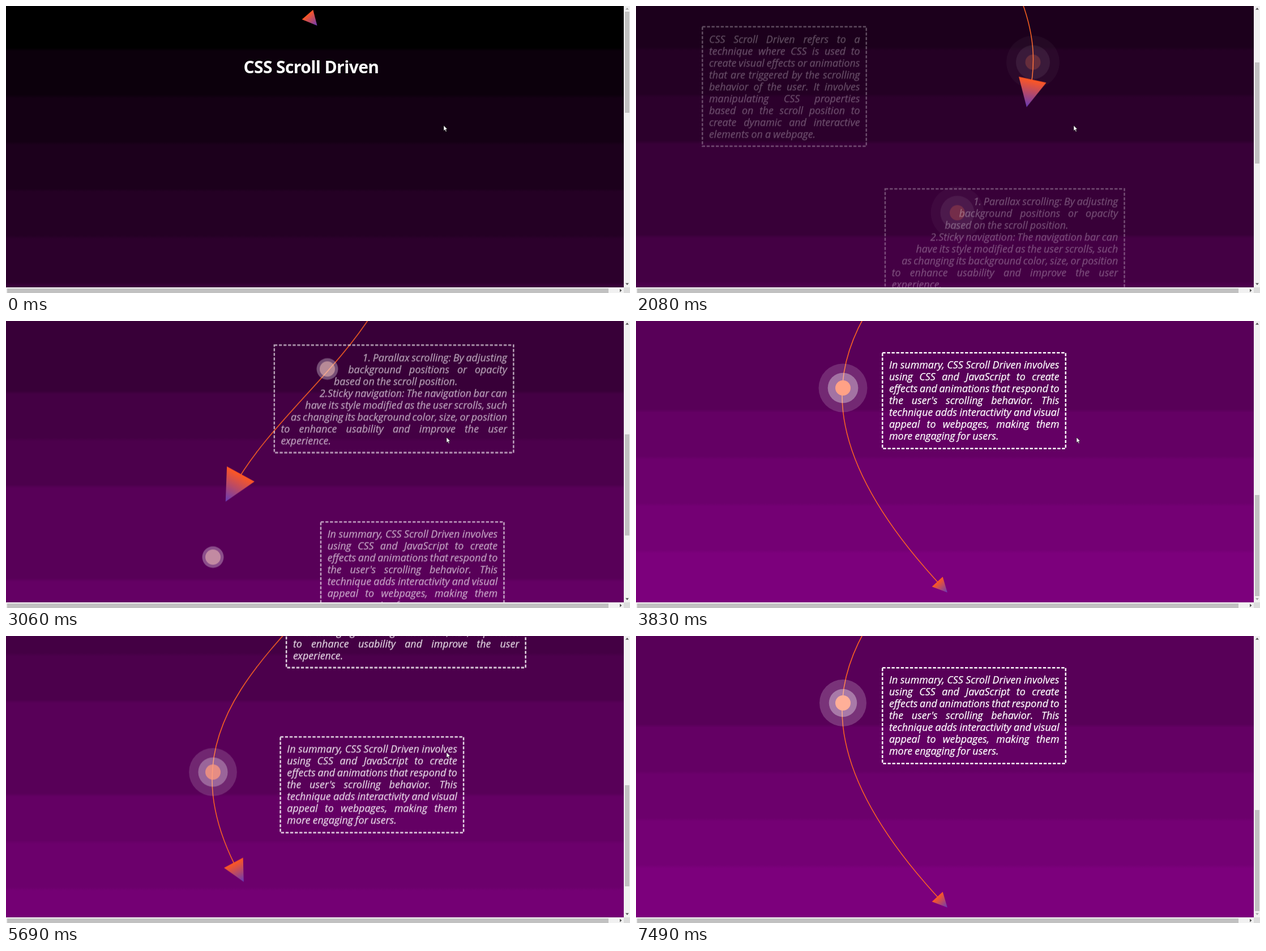
An HTML page that plays this animation: 1102 px wide and 508 px high, repeating every 7.51 s.

```html
<!DOCTYPE html>
<html lang="en">
<head>
<meta charset="utf-8">
<title>CSS Scroll Driven</title>
<style>
html, body { margin: 0; width: 100%; height: 100%; overflow: hidden; background: #f1f1f1; }
#stage { position: relative; width: 1102px; height: 508px; overflow: hidden; }
#view { position: absolute; width: 1091px; height: 498px; overflow: hidden; background: #000; }
#page { position: absolute; left: 0; top: 0; width: 1091px; height: 1329px; will-change: transform; }
#page > * { position: absolute; }
h1 {
  left: 419.5px; top: 88px; margin: 0; white-space: nowrap; color: #fff;
  font: bold 30px/40px "Open Sans", "Noto Sans", sans-serif; letter-spacing: -.6px;
}
svg { position: absolute; left: 0; top: 0; overflow: visible; }
.box {
  left: 0; box-sizing: border-box; padding: 12.5px 12.5px 12.5px 13px; color: #fff;
  font: italic 17.9px/21px "Open Sans", "Noto Sans", sans-serif; word-spacing: -3px;
  -webkit-text-stroke: .25px #fff;
}
.box svg { width: 100%; height: 100%; }
.box rect {
  x: 1.25px; y: 1.25px; width: calc(100% - 2.5px); height: calc(100% - 2.5px);
  fill: none; stroke: #fff; stroke-width: 2.5; stroke-dasharray: 5.4 2.7;
}
.line { position: relative; height: 21px; white-space: nowrap; text-align: justify; text-align-last: justify; }
.line.end { text-align-last: left; word-spacing: -.5px; }
.bar { position: absolute; background: #c1c1c1; }
#vbar { left: 1093px; top: 0; width: 8px; height: 179px; }
#hbar { left: 2px; top: 499.5px; width: 1062px; height: 8px; }
#corner { position: absolute; left: 1091px; top: 498px; width: 11px; height: 10px; background: #dcdcdc; }
</style>
</head>
<body>
<div id="stage">
  <div id="view">
    <div id="page">
      <h1>CSS Scroll Driven</h1>
      <svg id="back" width="1091" height="1329">
        <path id="trail" fill="none" stroke="#ff6422" stroke-width="1.5"
          d="M541 25 Q701.5 209 701.5 345 C701.5 600 364 723 364 962 Q364 1112 541 1302"/>
      </svg>
      <svg id="front" width="1091" height="1329">
        <defs>
          <linearGradient id="fade"><stop stop-color="#ff5722"/><stop offset="1" stop-color="#673ab7"/></linearGradient>
        </defs>
        <path id="arrow" d="M-.5 -.5 L.5 0 L-.5 .5 Z" fill="url(#fade)"/>
      </svg>
    </div>
  </div>
  <div id="vbar" class="bar"></div>
  <div id="hbar" class="bar"></div>
  <div id="corner"></div>
  <svg width="1102" height="508">
    <path id="up" d="M1094 6.5 h6 l-3 -3.5 z"/>
    <path id="down" d="M1094 490.5 h6 l-3 3.5 z"/>
    <path d="M1084 500.5 v6 l3.5 -3 z" fill="#505050"/>
    <path id="cursor" d="M0 0 V9.2 L2.1 7.4 L3.7 10.9 L5.2 10.2 L3.6 6.9 L6.4 6.6 Z"
      fill="#fff" stroke="#000" stroke-width=".5"/>
  </svg>
</div>
<script>
const LOOP = 7510, MAX = 831, PULSE = 1930, LAG = 30, DOT = 13.5;
const $ = id => document.getElementById(id);
const page = $('page'), trail = $('trail'), arrow = $('arrow'), front = $('front');

// [time, scroll offset]
const SCROLL = [
  [1510, 0], [1545, 30], [1900, 195], [2050, 239], [2080, 250.5], [2260, 262],
  [2290, 268], [2900, 515], [3000, 531], [3060, 531], [3550, 815], [3620, MAX],
  [4250, MAX], [4400, 700], [4600, 475], [4780, 243], [4810, 203], [4970, 0],
  [5250, 0], [5600, 655], [5655, 708], [5690, 708], [5880, MAX]
];
const CURSOR_X = [[2900, 773], [3000, 778], [6200, 778], [6550, 768]];
const CURSOR_Y = [[2900, 211.5], [3000, 206], [6200, 206], [6550, 510]];

// pulse rings: [phase, value]
const INNER = [[0, 0], [.67, 13.2], [.77, 16.6], [1, 20]];
const OUTER = [[0, 0], [.28, 5.6], [.57, 28], [.67, 29.3], [.77, 33.5], [1, 40]];
const INNER_ALPHA = [[.67, .35], [1, 0]];
const OUTER_ALPHA = [[.6, .2], [1, 0]];

function at(table, t) {
  if (t <= table[0][0]) return table[0][1];
  for (let i = 1; i < table.length; i++) {
    const [t0, a] = table[i - 1], [t1, b] = table[i];
    if (t <= t1) return a + (b - a) * (t - t0) / (t1 - t0);
  }
  return table[table.length - 1][1];
}

function bands() {
  const merged = { 0: 0, 6: 56, 7: 56, 10: 88, 11: 88 };
  const stops = [];
  for (let k = 0; k < 16; k++) {
    const c = merged[k] ?? 8 * k + 4;
    const end = k < 15 ? 83 * k + 74 : 1329;
    stops.push(`rgb(${c},0,${c}) ${k ? 83 * k - 3 : 0}px ${end}px`);
  }
  return `linear-gradient(${stops})`;
}
page.style.background = bands();

function svgNode(parent, tag, attrs = {}) {
  const el = document.createElementNS('http://www.w3.org/2000/svg', tag);
  for (const k in attrs) el.setAttribute(k, attrs[k]);
  return parent.appendChild(el);
}

const dots = [[701, 350], [567.5, 616.5], [365.5, 949.5]].map(([cx, cy]) => {
  const group = svgNode($('back'), 'g');
  const circle = () => svgNode(group, 'circle', { cx, cy, r: DOT, fill: '#fff' });
  return { group, outer: circle(), inner: circle(), core: circle() };
});

// a trailing "/" marks a line that is not justified
const BOXES = [
  { top: 286, width: 292, x: 15, shift: 335, text:
    'CSS Scroll Driven refers to a|technique where CSS is used to|create visual effects or animations|' +
    'that are triggered by the scrolling|behavior of the user. It involves|manipulating CSS properties|' +
    'based on the scroll position to|create dynamic and interactive|elements on a webpage./' },
  { top: 573, width: 425, x: 408.6, shift: 100, slope: 144, text:
    '1. Parallax scrolling: By adjusting|background positions or opacity|based on the scroll position./|' +
    '2.Sticky navigation: The navigation bar can|have its style modified as the user scrolls, such|' +
    'as changing its background color, size, or position|to enhance usability and improve the user|experience./' },
  { top: 885.5, width: 326, x: 769, shift: -335, text:
    'In summary, CSS Scroll Driven involves|using CSS and JavaScript to create|' +
    'effects and animations that respond to|the user\'s scrolling behavior. This|' +
    'technique adds interactivity and visual|appeal to webpages, making them|more engaging for users./' }
];

for (const b of BOXES) {
  b.el = document.createElement('div');
  b.el.className = 'box';
  b.el.style.top = b.top + 'px';
  b.el.style.width = b.width + 'px';
  b.el.innerHTML = '<svg><rect/></svg>';
  b.text.split('|').forEach((text, i) => {
    const line = document.createElement('div');
    line.className = text.endsWith('/') ? 'line end' : 'line';
    line.textContent = text.replace('/', '');
    line.style.marginLeft = Math.max(0, (b.slope || 0) - 25.3 * i) + 'px';
    b.el.append(line);
  });
  page.insertBefore(b.el, front);
}

const length = trail.getTotalLength();

function drawArrow(p) {
  const d = p * length;
  const c = trail.getPointAtLength(d);
  const a = trail.getPointAtLength(Math.max(0, d - 1));
  const b = trail.getPointAtLength(Math.min(length, d + 1));
  const angle = Math.atan2(b.y - a.y, b.x - a.x) * 180 / Math.PI;
  const size = 67 - 82 * Math.abs(p - .5);
  arrow.setAttribute('transform', `translate(${c.x} ${c.y}) rotate(${angle}) scale(${size})`);
  trail.style.strokeDasharray = `${d} ${length + 10}`;
}

function drawDots(t, p) {
  const u = ((t - 3830) / PULSE + 2.674) % 1;
  const ring = (el, size, alpha) => {
    el.setAttribute('r', DOT + at(size, u));
    el.setAttribute('fill-opacity', at(alpha, u));
  };
  for (const { group, outer, inner, core } of dots) {
    ring(outer, OUTER, OUTER_ALPHA);
    ring(inner, INNER, INNER_ALPHA);
    core.setAttribute('fill', `rgb(255,${255 - 140 * u},${255 - 180 * u})`);
    group.style.opacity = p;
  }
}

function draw(t) {
  const scroll = at(SCROLL, t), p = scroll / MAX;
  page.style.transform = `translateY(${-scroll}px)`;
  drawArrow(at(SCROLL, t - LAG) / MAX);
  drawDots(t, p);
  for (const b of BOXES) {
    b.el.style.opacity = p;
    b.el.style.transform = `translateX(${b.x + b.shift * p}px)`;
  }
  $('vbar').style.transform = `translateY(${10 + 298 * p}px)`;
  $('up').setAttribute('fill', p > 0 ? '#505050' : '#a3a3a3');
  $('down').setAttribute('fill', p < 1 ? '#505050' : '#a3a3a3');
  const y = at(CURSOR_Y, t);
  $('cursor').setAttribute('transform', `translate(${at(CURSOR_X, t)} ${y})`);
  $('hbar').style.background = y > 498 && y < 508 ? '#a8a8a8' : '#c1c1c1';
}

function tick() {
  draw(performance.now() % LOOP);
  requestAnimationFrame(tick);
}
tick();
</script>
</body>
</html>
```
